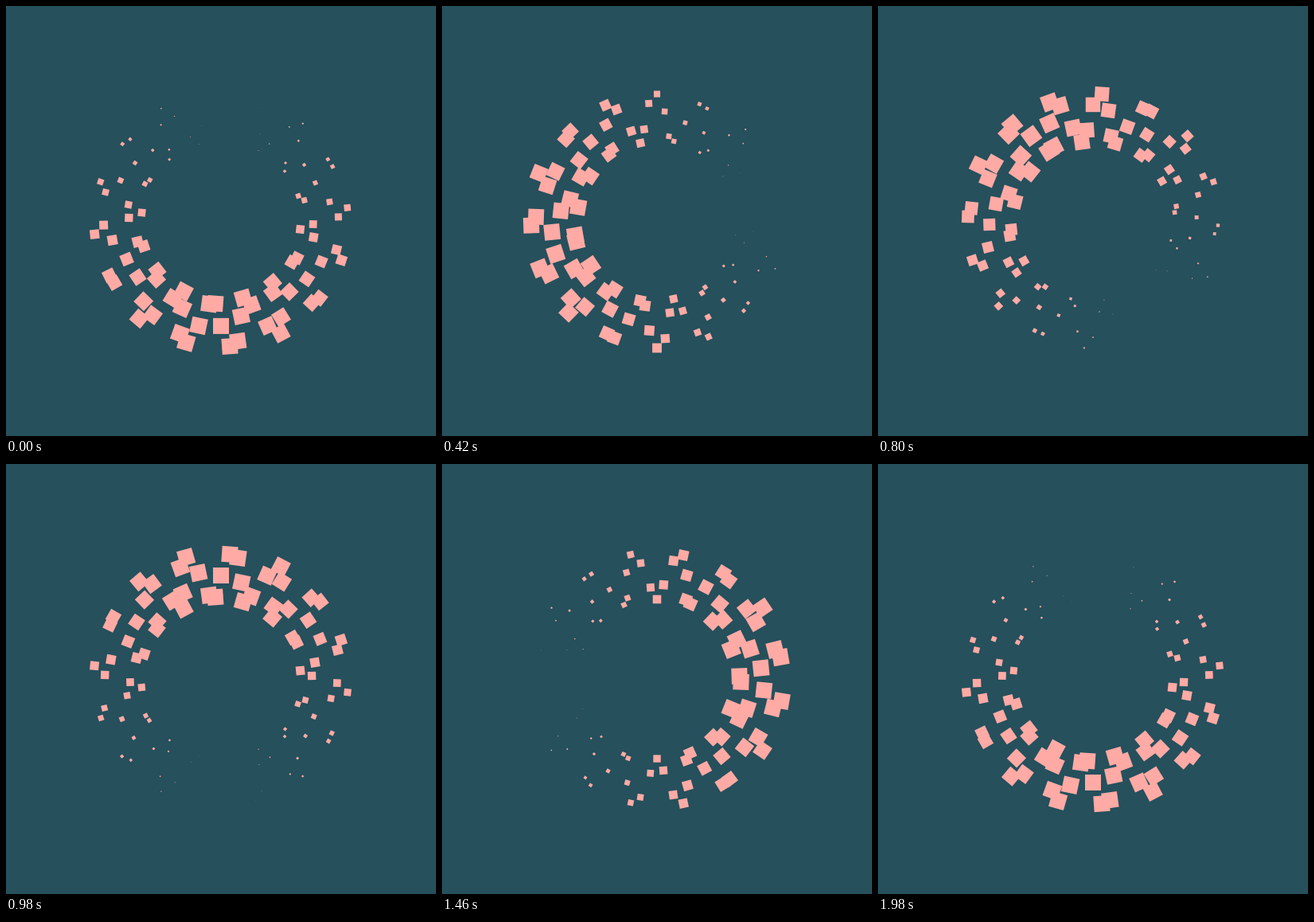
An HTML page with a canvas for the animation above (2000 ms loop, 540x540 px).

```html
<!DOCTYPE html>
<html lang="en">
<head>
<meta charset="utf-8">
<title>Rotating ring of squares</title>
<style>
  html, body { margin: 0; width: 100%; height: 100%; overflow: hidden; background: #25505c; }
  canvas { display: block; width: 100vmin; height: 100vmin; }
</style>
</head>
<body>
<canvas id="stage" width="540" height="540"></canvas>
<script>
const ctx = document.getElementById('stage').getContext('2d');
const TAU = Math.PI * 2;
const LOOP = 2000, STEP = 20;
const COUNT = 90, WAVES = 16;
const RADIUS = 130, SWING = 30, MAX_SIZE = 20;

function draw(now) {
  const phase = TAU * (Math.floor(now % LOOP / STEP) + 1) * STEP / LOOP;

  ctx.setTransform(1, 0, 0, 1, 0, 0);
  ctx.fillStyle = '#25505c';
  ctx.fillRect(0, 0, 540, 540);
  ctx.fillStyle = '#ffaaa5';

  for (let i = 0; i < COUNT; i++) {
    const turn = TAU * i / COUNT; // clockwise from the top
    const radius = RADIUS + SWING * Math.cos(WAVES * turn + TAU / 4 - phase);
    const size = MAX_SIZE * (1 - Math.cos(turn - phase)) / 2;
    ctx.setTransform(1, 0, 0, 1, 270, 270);
    ctx.rotate(turn);
    ctx.fillRect(-size / 2, -radius - size / 2, size, size);
  }
  requestAnimationFrame(draw);
}
requestAnimationFrame(draw);
</script>
</body>
</html>
```
